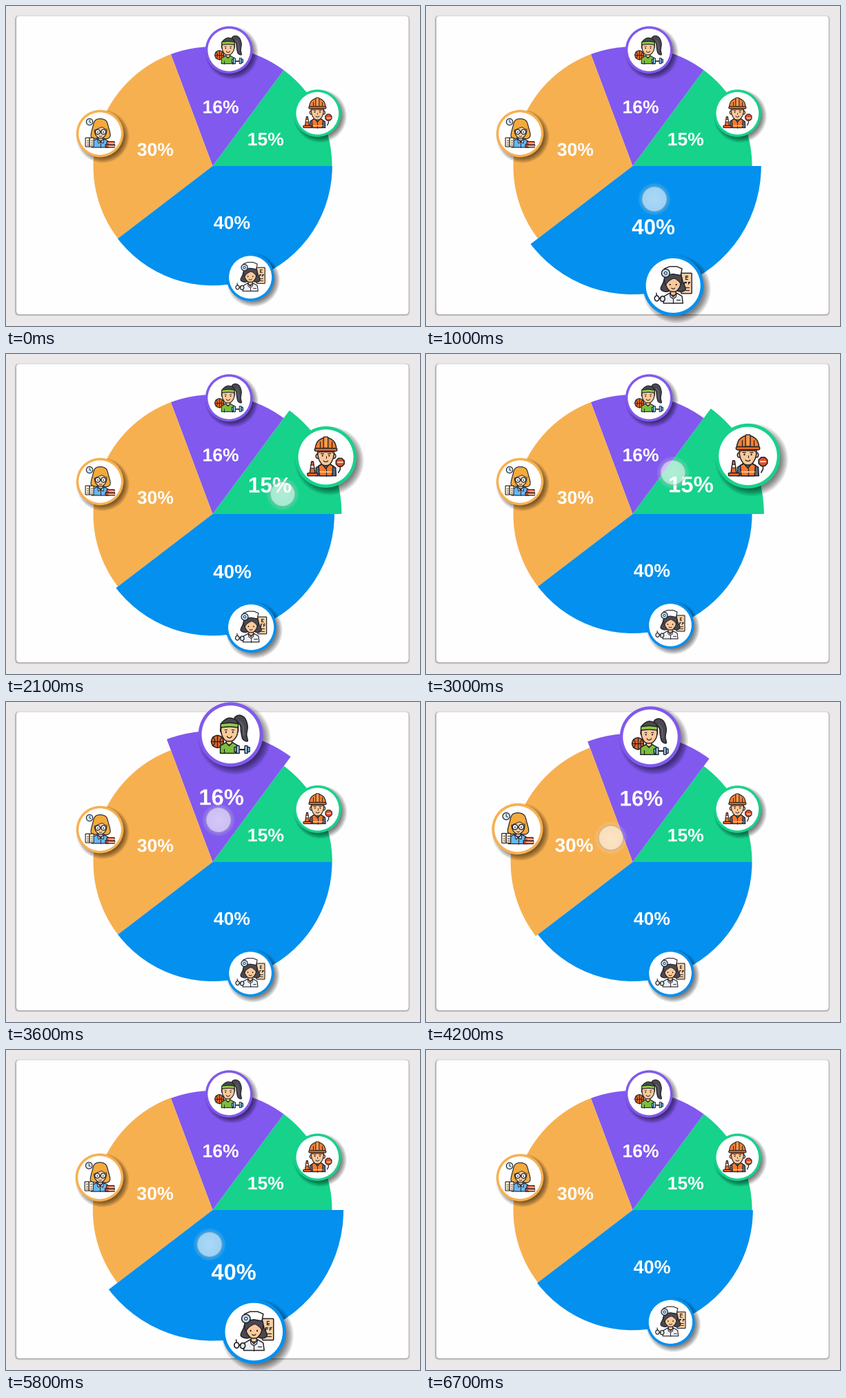
Write a matplotlib script that moves like this. It is 600 px wide and 464 px high and loops after 6.8 s.

```python
import matplotlib.pyplot as plt
import numpy as np
from matplotlib.animation import FuncAnimation
from matplotlib.patches import Ellipse, FancyBboxPatch, PathPatch, Polygon, Wedge
from matplotlib.textpath import TextPath
from matplotlib.transforms import Affine2D

W, H, DPI = 600, 464, 80
LOOP, STEP = 6800, 100
PX = 72 / DPI
CX, CY, R = 299.5, 232, 173
FADE = 600

INK, SKIN, WHITE = "#221f25", "#fbc99a", "#ffffff"
BLUE, ORANGE, PURPLE, GREEN = "#0390ee", "#f7b050", "#8159ee", "#16d28b"

fig = plt.figure(figsize=(W / DPI, H / DPI), dpi=DPI, facecolor="#ebe8e9")
ax = fig.add_axes([0, 0, 1, 1])
ax.set(xlim=(0, W), ylim=(H, 0))
ax.axis("off")

# CSS "ease" curve, cubic-bezier(.25, .1, .25, 1)
u = np.linspace(0, 1, 101)
EASE_X = 0.75 * u * (1 - u) + u**3
EASE_Y = 0.3 * u * (1 - u)**2 + 3 * u**2 * (1 - u) + u**3


def ease(p):
    return np.interp(p, EASE_X, EASE_Y)


def rounded(x, y, w, h, r, **kw):
    return FancyBboxPatch((x, y), w, h, boxstyle=f"round,pad=0,rounding_size={r}", **kw)


def spline(pts, n=8):
    """Closed Catmull-Rom curve through pts."""
    b = np.array(pts, float)
    a, c, d = np.roll(b, 1, 0), np.roll(b, -1, 0), np.roll(b, -2, 0)
    t = np.linspace(0, 1, n, endpoint=False)[:, None, None]
    p = 0.5 * (2 * b + (c - a) * t + (2 * a - 5 * b + 4 * c - d) * t**2
               + (3 * b - a - 3 * c + d) * t**3)
    return p.swapaxes(0, 1).reshape(-1, 2)


class Group:
    """Patches that share one movable, scalable frame."""

    def __init__(self):
        self.tr = Affine2D()
        self.parts = []

    def add(self, patch, lw=0):
        patch.set_linewidth(lw * PX)
        patch.set_transform(self.tr + ax.transData)
        ax.add_patch(patch)
        self.parts.append((patch, lw))

    def shape(self, pts, fc, lw=1.1):
        self.add(Polygon(pts, fc=fc, ec=INK if lw else "none", joinstyle="round"), lw)

    def blob(self, pts, fc, lw=1.1):
        self.shape(spline(pts), fc, lw)

    def oval(self, x, y, rx, ry, fc, lw=1.1, ec=INK):
        self.add(Ellipse((x, y), 2 * rx, 2 * ry, fc=fc, ec=ec if lw else "none"), lw)

    def box(self, x, y, w, h, fc, lw=1.1, r=0.8):
        self.add(rounded(x, y, w, h, r, fc=fc, ec=INK if lw else "none"), lw)

    def line(self, *pts, lw=0.9, ec=INK):
        self.add(Polygon(pts, closed=False, fill=False, ec=ec, capstyle="round"), lw)

    def arc(self, x, y, rx, ry, a, b, lw=0.9):
        t = np.radians(np.linspace(a, b, 14))
        self.line(*zip(x + rx * np.cos(t), y + ry * np.sin(t)), lw=lw)

    def eyes(self, x, y, gap):
        for side in (-1, 1):
            self.oval(x + side * gap, y, 0.8, 0.95, INK, 0)

    def place(self, x, y, s, flip=1):
        self.tr.clear().scale(s, flip * s).translate(x, y)
        for patch, lw in self.parts:
            patch.set_linewidth(lw * s * PX)


def nurse(g):
    g.box(9, -14, 12, 23, "#f7cfa3")
    for x, y, s in ((13.5, -11.5, 4), (12.5, -4.5, 3), (16.8, -4.5, 3)):
        g.line((x + s * 0.7, y), (x, y), (x, y + s))
        g.line((x, y + s / 2), (x + s * 0.6, y + s / 2))
    g.line((13.5, -7.5), (16.3, -7.5))
    g.line((13, 2), (18, 2))
    g.line((14, 5), (18, 5))
    g.blob([(-8, -13), (0, -16), (8, -13), (11, -4), (14, 4), (9, 7), (0, 5),
            (-8, 7), (-14, 4), (-11, -4)], "#4b4851")
    g.box(-3, 4, 6, 7, SKIN)
    g.shape([(-11, 20), (-10, 12), (-4, 8.5), (0, 13), (4, 8.5), (10, 12), (11, 20)], "#edf1f5")
    g.line((-4, 8.5), (-3, 13), (0, 15), (3, 13), (4, 8.5))
    g.line((0, 15), (0, 20))
    g.line((4, 16), (8, 16))
    g.blob([(-8, -8), (0, -10), (8, -8), (8, 0), (4, 6), (0, 7), (-4, 6), (-8, 0)], SKIN)
    g.blob([(-9, -11), (0, -13), (9, -11), (9, -2), (6, -5), (1, -8), (-5, -5), (-9, -1)],
           "#4b4851", 0.8)
    g.shape([(-10, -19), (-4, -21.5), (4, -21.5), (10, -19), (8.5, -11.5), (0, -13), (-8.5, -11.5)],
            WHITE)
    g.oval(-8.5, -14, 4.6, 4.6, "#b7dcf4")
    g.oval(-8.5, -14, 1.5, 1.5, WHITE, 0.8)
    g.eyes(0, -1, 3.5)
    g.arc(0, 2.3, 2, 1.5, 20, 160)
    g.oval(-18.5, 14.5, 2.5, 3, "none", 1.2)
    g.oval(-12, 15, 2.7, 3, "#dcecf6", 1.2)
    g.line((-18.5, 11.5), (-19, 8.5), lw=1.1)
    g.line((-16, 14), (-14.5, 14), lw=1.1)


def teacher(g):
    g.oval(-15, -17, 4.7, 4.7, "#cfeafa")
    g.line((-15, -20), (-15, -17), (-13, -15.7))
    g.blob([(-7, -19), (1, -21.5), (9, -18.5), (12.5, -9), (15, 3), (10, 7.5), (1, 6),
            (-9, 7), (-13, 3), (-10.5, -9)], "#f3aa3c")
    g.box(-2, 3, 6, 7, SKIN)
    g.shape([(-12, 20), (-11, 11), (-4, 7.5), (1, 12), (6, 7.5), (12, 11), (13, 20)], "#67b7f0")
    g.shape([(-4, 7.5), (1, 12), (6, 7.5), (5, 14), (1, 12), (-2, 14)], "#a9d8f7", 0.9)
    g.line((1, 13), (1, 20))
    g.blob([(-7, -9), (1, -11), (9, -9), (9, 0), (5, 5.5), (1, 6.8), (-3, 5.5), (-7, 0)], "#fbd0a5")
    g.blob([(-8, -10), (-4, -17), (3, -18), (9, -13), (9.5, -6), (4, -9.5), (-2, -8), (-8, -5)],
           "#f3aa3c", 0)
    g.line((-7.5, -5), (-2, -7.5), (3, -9.5), (9, -6))
    for x in (-3.2, 5.2):
        g.oval(x, -2.5, 3.5, 3.5, "#e9f5fb", 1.2)
    g.line((0.2, -3), (1.8, -3))
    g.eyes(1, -2.2, 4.1)
    g.arc(1, 2.9, 1.9, 1.3, 20, 160)
    g.box(-21, 6, 6, 13, "#fff1d7")
    g.box(-15, 6, 6, 13, "#fff1d7")
    for y in (9.5, 12.5, 15.5):
        g.line((-19, y), (-17, y), lw=0.8)
        g.line((-13, y), (-11, y), lw=0.8)
    g.box(10, 11.5, 11, 4, "#ef7048")
    g.box(8, 15.5, 13.5, 4.5, "#cf4327")
    g.line((13, 13.5), (20.5, 13.5), lw=1.2, ec="#ffe2c0")
    g.line((12, 17.8), (21, 17.8), lw=1.2, ec="#ffe2c0")


def athlete(g):
    g.blob([(4, -17), (9, -20.5), (15, -17.5), (18, -9), (17, 0), (18, 7), (13, 5), (11, -3),
            (10, -10)], "#4a4850")
    g.line((10, -14), (13.5, -9), (14, 1), lw=0.8, ec="#75727c")
    g.blob([(-9, -13), (-2, -17.5), (6, -15), (8, -8), (7, -2), (-1, 0), (-10, -2), (-10.5, -8)],
           "#4a4850")
    g.oval(-14, 7.5, 6.5, 6.5, "#d9662a")
    g.line((-14, 1), (-14, 14))
    g.line((-20.5, 7.5), (-7.5, 7.5))
    g.arc(-20, 7.5, 3.2, 4.8, -75, 75)
    g.arc(-8, 7.5, 3.2, 4.8, 105, 255)
    g.box(-4.5, 4, 6, 7, SKIN)
    g.shape([(-11, 20), (-11, 12), (-5, 8.5), (-1.5, 12), (2, 8.5), (8, 12), (9, 20)], "#7abf3d")
    g.line((-7, 15), (-7, 20))
    g.line((4.5, 15), (4.5, 20))
    g.blob([(-9.5, -8), (-1, -10), (7, -8), (7, 0), (3, 6), (-1.5, 7.2), (-6, 6), (-9.5, 0)], SKIN)
    g.shape([(-10.5, -11.5), (-1, -12.5), (8, -11.5), (8, -7.5), (-1, -8.3), (-10.5, -7.5)], "#8ccc45")
    g.eyes(-1.3, -2.5, 3.6)
    g.line((-6.3, -4.8), (-3.8, -4.9), lw=0.8)
    g.line((1.2, -4.9), (3.8, -4.8), lw=0.8)
    g.arc(-1.3, 1.2, 2.6, 2.4, 15, 165)
    g.line((6, 16), (19, 16), lw=1.6)
    for x, w, h in ((4, 2.2, 5), (6.2, 3, 8), (15, 3, 8), (18, 2.2, 5)):
        g.box(x, 16 - h / 2, w, h, "#8fccf3", 1, 0.5)


def builder(g):
    g.shape([(-11, 21), (-11, 12), (-5, 8), (5, 8), (11, 12), (11.5, 21)], "#59677a")
    g.shape([(-7, 21), (-8, 10), (-4, 8), (0, 13), (4, 8), (8, 10), (7, 21)], "#f17a30")
    g.line((0, 13), (0, 21))
    g.line((-6.6, 17), (6.6, 17), lw=1.2, ec="#ffd18a")
    for x in (-9.3, 9.3):
        g.oval(x, -1, 1.8, 2.5, SKIN)
    g.blob([(-8.5, -8), (0, -9), (8.5, -8), (8.3, 1), (4.5, 8), (0, 9.5), (-4.5, 8), (-8.3, 1)], SKIN)
    g.shape([(-8.5, -7), (8.5, -7), (8.5, -3), (7, -5), (-7, -5), (-8.5, -3)], "#6d4630", 0)
    g.eyes(0, -1.5, 3.7)
    g.line((-5.5, -3.8), (-2.3, -3.6))
    g.line((2.3, -3.6), (5.5, -3.8))
    g.line((0, -1), (0, 1.5), lw=0.8)
    g.arc(0, 3.7, 2.5, 1.7, 15, 165)
    g.blob([(-11, -8), (-10, -16), (-5, -20.5), (0, -21.5), (5, -20.5), (10, -16), (11, -8), (0, -8.5)],
           "#f08132")
    g.box(-2.5, -22.5, 5, 12.5, "#f79a4d", 1)
    g.line((-6.5, -17), (-6.5, -11))
    g.line((6.5, -17), (6.5, -11))
    g.box(-12.5, -9.8, 25, 3.2, "#e66c25", 1.1, 1.4)
    g.shape([(-18, 18.5), (-16, 5), (-14, 5), (-12, 18.5)], "#ee6a2c")
    g.shape([(-17, 12.5), (-16.5, 9), (-13.5, 9), (-13, 12.5)], "#fff3e4", 0.8)
    g.box(-20.5, 18, 11.5, 3, "#ee6a2c")
    g.line((16, 10), (16, 14), (14, 17.5), lw=1.2)
    a = np.radians(np.arange(8) * 45 + 22.5)
    g.shape(np.c_[16 + 5 * np.cos(a), 6 + 5 * np.sin(a)], "#df4f2c")
    g.line((13.5, 6), (18.5, 6), lw=1.3, ec="#ffe6d6")


class Slice:
    """Share of the pie; windows are (start, end, rise time) in ms."""

    def __init__(self, share, start, total, color, icon, windows):
        a, b = start / total * 360, (start + share) / total * 360
        mid = np.radians((a + b) / 2)
        self.dir = np.array([np.cos(mid), -np.sin(mid)])
        self.windows, self.color, self.icon, self.share = windows, color, icon, share
        self.wedge = ax.add_patch(Wedge((CX, CY), R, -b, -a, fc=color, ec="none"))

    def decorate(self):
        self.label, self.badge = Group(), Group()
        path = TextPath((0, 0), f"{self.share}%", size=26.5,
                        prop={"family": "Liberation Sans", "weight": "bold"})
        box = path.get_extents()
        path = path.transformed(Affine2D().translate(-(box.x0 + box.x1) / 2, -(box.y0 + box.y1) / 2))
        self.label.add(PathPatch(path, fc=WHITE, ec="none"))
        for k in range(9):
            self.badge.oval(4, 4, 38.5 - k, 38.5 - k, (0, 0, 0, 0.07), 0)
        self.badge.oval(0, 0, 34.3, 34.3, self.color, 0)
        self.badge.oval(0, 0, 30.8, 30.8, WHITE, 0)
        self.icon(self.badge)

    def at(self, r):
        return CX + self.dir[0] * r, CY + self.dir[1] * r

    def update(self, t):
        g = sum(ease((t + k - on) / rise) - ease((t + k - off) / FADE)
                for on, off, rise in self.windows for k in (0, LOOP))
        s = 1 + 0.1 * g
        self.wedge.set_radius(R * s)
        self.label.place(*self.at(R / 2 * s), 1 + 0.24 * g, -1)
        self.badge.place(*self.at(170 * s), 1 + 0.37 * g)


# Card with a soft drop shadow
for k in range(4):
    ax.add_patch(rounded(14 - k / 2, 15 - k / 2, 570 + k, 433 + k, 6, fc=(0, 0, 0, 0.07), ec="none"))
ax.add_patch(rounded(15, 14.5, 568.5, 432.5, 5, fc="#fffeff", ec="none"))

slices, start = [], 0
for share, color, icon, windows in (
        (15, GREEN, builder, [(1800, 3100, FADE)]),
        (16, PURPLE, athlete, [(3100, 4100, FADE)]),
        (30, ORANGE, teacher, [(4100, 5350, FADE)]),
        (40, BLUE, nurse, [(800, 1800, 430), (5350, 6300, FADE)])):
    slices.append(Slice(share, start, 101, color, icon, windows))
    start += share
for s in slices:
    s.decorate()

cursor = Group()
for k in range(6):
    cursor.oval(0, 0, 24 - k, 24 - k, (1, 1, 1, 0.04), 0)
cursor.oval(0, 0, 18, 18, (1, 1, 1, 0.52), 0)
cursor.oval(0, 0, 18, 18, "none", 2, (0.5, 0.52, 0.55, 0.3))
for k in range(4):
    cursor.oval(0, 0, 13 - 3 * k, 13 - 3 * k, (1, 1, 1, 0.04), 0)
tints = [(p, p.get_facecolor(), p.get_edgecolor()) for p, _ in cursor.parts]

# Cursor path: time, x, y
KEYS = np.array([(800, 331, 281), (1000, 331, 280), (1400, 350, 268), (1800, 390, 232),
                 (2100, 401, 203), (2600, 394, 183), (3000, 358, 172), (3100, 343, 170),
                 (3600, 308, 171), (4100, 284, 191), (4200, 268, 197), (4650, 242, 218),
                 (5100, 246, 249), (5350, 258, 266), (5800, 295, 282), (6400, 331, 284)], float)
SLOPES = np.gradient(KEYS[:, 1:], KEYS[:, 0], axis=0)


def cursor_at(t):
    t = np.clip(t, KEYS[0, 0], KEYS[-1, 0])
    i = min(np.searchsorted(KEYS[:, 0], t, side="right") - 1, len(KEYS) - 2)
    span = KEYS[i + 1, 0] - KEYS[i, 0]
    p = (t - KEYS[i, 0]) / span
    q = p * p * (3 - 2 * p)
    return (KEYS[i, 1:] * (1 - q) + KEYS[i + 1, 1:] * q
            + span * p * (1 - p) * ((1 - p) * SLOPES[i] - p * SLOPES[i + 1]))


def draw(n):
    t = n * STEP
    for s in slices:
        s.update(t)
    cursor.place(*cursor_at(t), 1)
    fade = np.interp(t, [800, 950, 6250, 6450], [0, 1, 1, 0])
    for patch, fc, ec in tints:
        patch.set_facecolor((*fc[:3], fc[3] * fade))
        patch.set_edgecolor((*ec[:3], ec[3] * fade))
    return []


anim = FuncAnimation(fig, draw, frames=LOOP // STEP, interval=STEP, repeat=True,
                     repeat_delay=0, init_func=lambda: draw(0))
plt.show()
```
